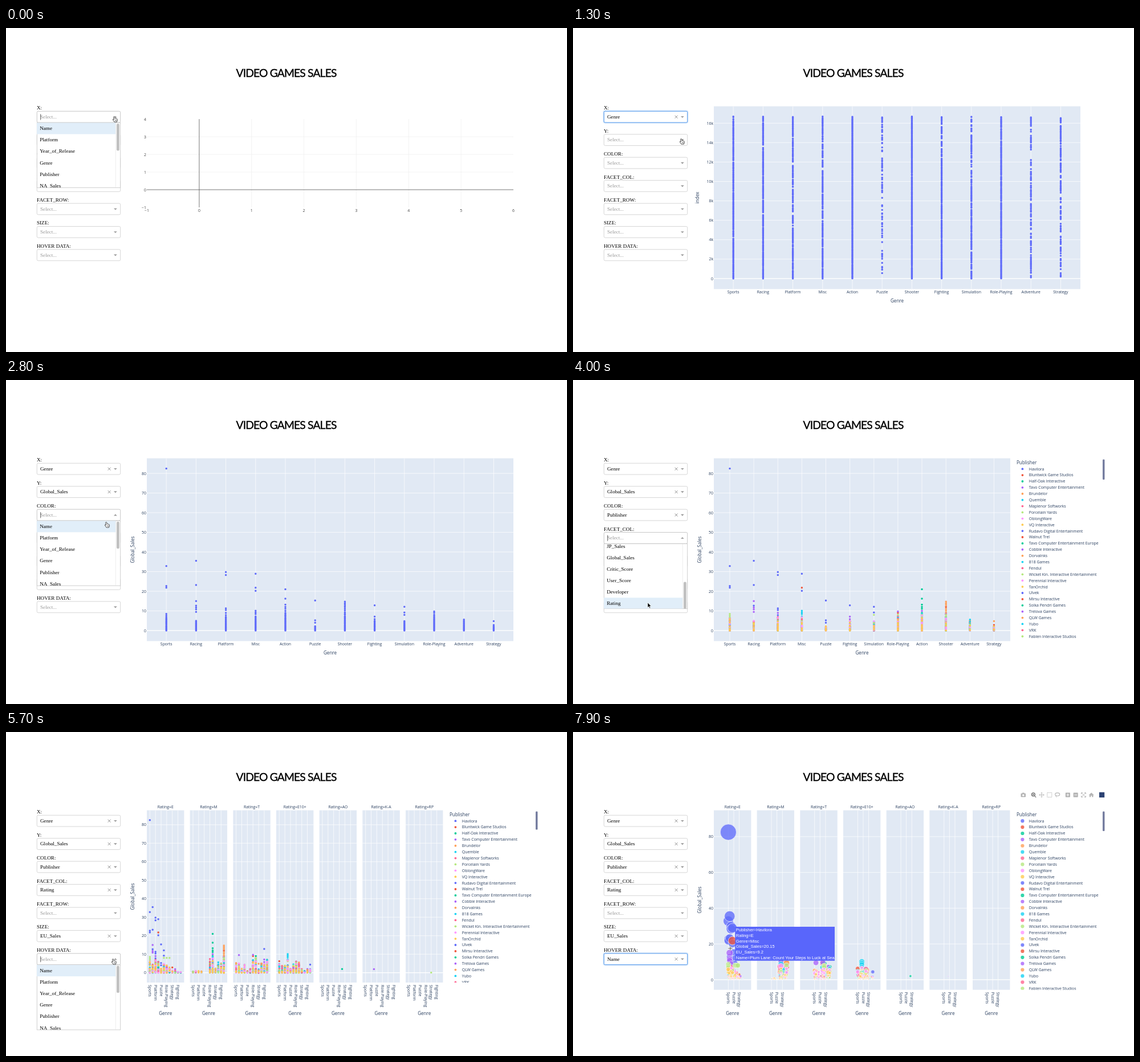
Recreate the animation shown at these times as an HTML page. Size 984 px wide and 569 px high, loop 8 s.

```html
<!DOCTYPE html>
<html lang="en">
<head>
<meta charset="utf-8">
<title>Sales explorer</title>
<style>
  html, body { margin: 0; width: 100%; height: 100%; overflow: hidden; background: #fff; }
  #stage { display: block; width: 100vw; height: 100vh; }
  text { white-space: pre; }
  .title { font: 19.3px Lato, sans-serif; letter-spacing: -.85px; fill: #000; stroke: #000; stroke-width: .35px; }
  .form { font: 9.15px "Liberation Serif", serif; fill: #000; }
  .hint { fill: #999; }
  .tick { font: 6.9px "Open Sans", sans-serif; fill: #2a3f5f; }
  .plain { fill: #444; }
  .axis { font: 8.05px "Open Sans", sans-serif; fill: #2a3f5f; }
  .tip { font: 7.5px "Liberation Sans", sans-serif; fill: #fff; }
  .mid { text-anchor: middle; }
  .end { text-anchor: end; }
</style>
</head>
<body>
<svg id="stage" viewBox="0 0 984 569"></svg>
<script>
const palette = ['#5f6bfa', '#ef553b', '#00cc96', '#ab63fa', '#ffa15a', '#19d3f3', '#ff6692', '#b6e880', '#ff97ff', '#fecb52'];
const labels = ['X:', 'Y:', 'COLOR:', 'FACET_COL:', 'FACET_ROW:', 'SIZE:', 'HOVER DATA:'];
const options = ['Name', 'Platform', 'Year_of_Release', 'Genre', 'Publisher', 'NA_Sales', 'EU_Sales', 'JP_Sales',
  'Global_Sales', 'Critic_Score', 'User_Score', 'Developer', 'Rating'];
const publishers = ['Havilora', 'Bluntwick Game Studios', 'Half-Oak Interactive', 'Tavo Computer Entertainment', 'Brundelor',
  'Quemble', 'Maplenor Softworks', 'Porcelain Yards', 'OblongWare', 'VQ Interactive', 'Rudavo Digital Entertainment',
  'Walnut Trel', 'Tavo Computer Entertainment Europe', 'Cobble Interactive', 'DorvaInks', '818 Games', 'Fendul',
  'Wicket Kin. Interactive Entertainment', 'Perennial Interactive', 'TanOrchid', 'Ulvek', 'Mirsu Interactive',
  'Solka Pendri Games', 'Trelova Games', 'QLW Games', 'Yubo', 'VRK', 'Fablen Interactive Studios'];
const fileOrder = ['Sports', 'Racing', 'Platform', 'Misc', 'Action', 'Puzzle', 'Shooter', 'Fighting', 'Simulation',
  'Role-Playing', 'Adventure', 'Strategy'];
const colorOrder = ['Sports', 'Racing', 'Platform', 'Misc', 'Puzzle', 'Fighting', 'Simulation', 'Role-Playing', 'Action',
  'Shooter', 'Adventure', 'Strategy'];
const facetOrder = ['Sports', 'Racing', 'Platform', 'Misc', 'Puzzle', 'Simulation', 'Role-Playing', 'Action', 'Strategy',
  'Adventure', 'Fighting', 'Shooter'];
const ratings = ['E', 'M', 'T', 'E10+', 'AO', 'K-A', 'RP'];

let seed = 11;
const random = () => (seed = (seed * 16807) % 2147483647) / 2147483647;
const range = n => [...Array(n).keys()];
const text = (x, y, s, cls, extra = '') => `<text x="${x}" y="${y}" class="${cls}" ${extra}>${s}</text>`;
const rect = (x, y, w, h, fill, extra = '') => `<rect x="${x}" y="${y}" width="${w}" height="${h}" fill="${fill}" ${extra}/>`;
const path = (d, stroke, width, extra = '') => `<path d="${d}" fill="none" stroke="${stroke}" stroke-width="${width}" ${extra}/>`;
const turned = (x, y, angle, s, cls) => text(x, y, s, cls, `transform="rotate(${angle} ${x} ${y})"`);

// Best sellers as value:colour+rating index, then random smaller sales below them.
const hits = {
  Sports: '82.5:00 32.8:00 22.7:00 21.8:00 8.5:70 7.6:70 6.8:70 5.2:42 6.2:13',
  Racing: '35.5:00 23.2:00 15:30 12.7:00 11.7:30 10.8:30 9.5:32',
  Platform: '29.8:00 28.3:00 11.3:00 10.4:00 9:30 7.8:00 6.5:00',
  Misc: '28.9:00 21.8:10 20.2:00 10.1:53 9.2:53 8.4:53 7.2:53',
  Puzzle: '15.3:00 5.2:00 4:00',
  Simulation: '12.1:00 9.2:00 8:70 4.5:53',
  'Role-Playing': '9.7:32 9:12 8:70 7.4:61 6:03',
  Action: '21:21 16.2:21 13.2:21 12:21 11.1:21 10:31 9:22 8:70 5.5:43 2:24',
  Strategy: '4.8:42 2.8:10 0.1:76',
  Adventure: '5.6:51 4.6:02 1.9:30',
  Fighting: '12.8:02 7.1:32 5.8:32',
  Shooter: '14.7:41 14:41 13.4:41 12.7:41 12:11 11.2:41 10.3:41 7:22 4.4:03'
};
const stackTops = [
  [6, 5, 7, 6, 3.5, 5, 4, 3, 1.6, 1.4, .5, .5],
  [.8, 1, 1, 1, 0, 0, 6.5, 9, 2.5, 5, 5, 10],
  [5, 5, 2.5, 5, 1, 2, 7, 8, 2, 5, 5, 7],
  [5, 4, 4, 7, 2, 4, 6, 5, 2, 1, 2, 2]
];
const games = [];
for (const genre of facetOrder)
  for (const hit of hits[genre].split(' ')) {
    const [value, code] = hit.split(':');
    games.push({ genre, value: +value, color: +code[0], rating: +code[1], bulk: 1 });
  }
games.push({ genre: 'Misc', value: 1.9, color: 3, rating: 5, bulk: .4 });
stackTops.forEach((tops, rating) => tops.forEach((top, i) => {
  for (let n = top ? top * 5 + 3 : 0; n > 0; n--)
    games.push({ genre: facetOrder[i], value: top * random() ** 1.7, color: Math.floor(random() * 10), rating, bulk: .4 + random() * .8 });
}));
games.sort((a, b) => a.color - b.color);

const dots = (points, color) =>
  path(points.map(([x, y]) => `M${x.toFixed(1)} ${y.toFixed(1)}h.01`).join(''), color, 3.5, 'stroke-linecap="round"');
const colored = (list, place) => palette.map((c, i) => dots(list.filter(g => g.color === i).map(place), c)).join('');

function plot(x, w, bottom, xs, ys, zero) {
  return rect(x, 137.5, w, bottom - 137.5, '#e1e9f4') +
    path(xs.map(v => `M${v} 137.5V${bottom}`).join('') + ys.map(v => `M${x} ${v}h${w}`).join(''), '#fff', .7) +
    path(`M${x} ${zero}h${w}`, '#fff', 1.2);
}
const yLabels = (ys, names) => ys.map((y, i) => text(246, y + 2.5, names[i], 'tick end')).join('');

function emptyChart() {
  const xs = range(8).map(i => 247 + 91.86 * i), ys = range(6).map(i => 315 - 31 * i);
  const name = i => i ? i - 1 : '−1';
  return path(xs.slice(2, 7).map(x => `M${x} 160V315`).join('') + ys.slice(2, 5).map(y => `M247 ${y}H890`).join(''), '#eee', .7) +
    path('M338.9 160V315M247 284H890', '#555', .8) +
    xs.map((x, i) => text(x, 322.5, name(i), 'tick plain mid')).join('') +
    ys.map((y, i) => text(246, y + 2.5, name(i), 'tick plain end')).join('');
}

function genreChart(order, w, first, step, ys, names, yTitle, yTitleX, marks) {
  const xs = order.map((_, i) => first + step * i);
  return plot(247, w, 458.5, xs, ys, 440) + marks(xs) + yLabels(ys, names) +
    order.map((g, i) => text(xs[i], 466, g, 'tick mid')).join('') +
    text(247 + w / 2, 482, 'Genre', 'axis mid') + turned(yTitleX, 298, -90, yTitle, 'axis mid');
}

function indexChart() {
  const counts = [420, 420, 260, 250, 800, 95, 600, 380, 260, 480, 150, 170];
  const bias = [1.3, 1.1, 1.2, 1.2, 1, .8, 1.1, 1.4, 1.3, 1.2, 1, .75];
  const ys = range(9).map(i => 440 - 34.1 * i);
  return genreChart(fileOrder, 643, 281.2, 52.2, ys, ys.map((_, i) => i ? i * 2 + 'k' : 0), 'index', 220.5, xs =>
    dots(xs.flatMap((x, i) => range(counts[i]).map(() => [x, 440 - 284.5 * random() ** bias[i]])), palette[0]));
}

const tens = range(9).map(i => i * 10);
function salesChart(order, w, first, step, draw) {
  return genreChart(order, w, first, step, tens.map(v => 440 - 3.45 * v), tens, 'Global_Sales', 224.5, xs =>
    draw(g => [xs[order.indexOf(g.genre)], 440 - 3.45 * g.value]));
}

function facetChart({ bottom, zero, unit, first, step, every, ticks, titleY, marks }) {
  const ys = ticks.map(v => zero - unit * v);
  const shown = facetOrder.map((name, i) => ({ name, dx: first + step * i })).filter((_, i) => i % every === 0);
  const left = r => 247 + 75.67 * r;
  const frames = ratings.map((name, r) => {
    const x = left(r);
    return plot(x, 65.4, bottom, shown.map(s => x + s.dx), ys, zero) +
      text(x + 32.7, 133.7, 'Rating=' + name, 'tick mid') + text(x + 32.7, 497, 'Genre', 'axis mid') +
      shown.map(s => turned(x + s.dx - 2.4, bottom + 4, 90, s.name, 'tick')).join('');
  }).join('');
  return frames + marks(g => [left(g.rating) + first + step * facetOrder.indexOf(g.genre), zero - unit * g.value]) +
    yLabels(ys, ticks) + turned(224.5, titleY, -90, 'Global_Sales', 'axis mid');
}

function legend(bottom, barHeight, r, opacity) {
  const rows = publishers.map((name, i) => {
    const y = 156.2 + 10.89 * i;
    return `<circle cx="788.4" cy="${y}" r="${r}" fill="${palette[i % 10]}" opacity="${opacity}"/>` + text(799.8, y + 2.4, name, 'tick');
  }).join('');
  return text(778, 147.6, 'Publisher', 'axis') + `<svg width="984" height="${bottom}">${rows}</svg>` +
    rect(929, 139.5, 3.5, barHeight, '#757da0', 'rx="1.2"');
}

const bubbles = place => games.map(g => {
  const [x, y] = place(g);
  return `<circle cx="${x.toFixed(1)}" cy="${y.toFixed(1)}" r="${(1.55 * Math.sqrt(g.value) * g.bulk).toFixed(2)}" fill="${palette[g.color]}" fill-opacity=".78" stroke="#fff" stroke-width=".6"/>`;
}).join('');

const charts = [
  [0, emptyChart()],
  [1300, indexChart()],
  [2700, salesChart(fileOrder, 643, 281.2, 52.2, place => dots(games.map(place), palette[0]))],
  [3400, salesChart(colorOrder, 520, 275, 42.13, place => colored(games, place)) + legend(455, 35.5, 1.9, 1)],
  [4500, facetChart({ bottom: 440, zero: 422.7, unit: 3.248, first: 5.3, step: 4.93, every: 2, ticks: tens, titleY: 289,
    marks: place => colored(games, place) }) + legend(440, 32, 1.9, 1)],
  [6200, facetChart({ bottom: 452.7, zero: 435, unit: 3.14, first: 25.4, step: 2.4, every: 4, ticks: [0, 20, 40, 60, 80],
    titleY: 295, marks: bubbles }) + legend(452.7, 34.5, 3.1, .8)]
];

function modebar() {
  const gray = '#b5b5b5';
  return rect(785.5, 107.8, 8.6, 6.4, gray, 'rx="1"') + rect(788, 106.6, 3.6, 2, gray) + '<circle cx="789.8" cy="111" r="1.8" fill="#fff"/>' +
    '<circle cx="807.4" cy="109.8" r="2.9" fill="none" stroke="#666" stroke-width="1.3"/>' +
    path('M809.6 112L812.2 114.8M806 109.8h2.8M807.4 108.4v2.8', '#666', 1.1) +
    path('M818 110.5h8M822 106.5v8M820.7 107.6l1.3-1.4 1.3 1.4M820.7 113.4l1.3 1.4 1.3-1.4M819.1 109.2l-1.4 1.3 1.4 1.3M824.9 109.2l1.4 1.3-1.4 1.3', gray, .9) +
    rect(831.8, 106.6, 8, 7.8, 'none', `stroke="${gray}" stroke-dasharray="1.6 1"`) +
    `<ellipse cx="849.7" cy="109.6" rx="4" ry="2.7" fill="none" stroke="${gray}" stroke-width="1.1"/>` + path('M847 111.6q-.5 2 1.5 3', gray, 1) +
    rect(863.8, 106.4, 8.2, 8.2, gray, 'rx="1"') + rect(877.6, 106.4, 8.2, 8.2, gray, 'rx="1"') +
    path('M865.6 110.5h4.6M867.9 108.2v4.6M879.4 110.5h4.6', '#fff', 1.1) +
    path('M892.3 107.3l6.4 6.4M898.7 107.3l-6.4 6.4M891.6 109v-2.4h2.4M897 106.6h2.4v2.4M899.4 112v2.4H897M894 114.4h-2.4V112', gray, 1) +
    `<path d="M904.6 110.8l4.6-4.4 4.6 4.4h-1.3v3.5h-2.3v-2.5h-2v2.5h-2.3v-3.5z" fill="${gray}"/>` +
    rect(923, 105.8, 9.2, 9.2, '#2d4373');
}

const tips = [
  [7100, 7500, 282, 316.5, 116.5, ['Rating=E', 'Genre=Platform', 'Global_Sales=28.32', 'EU_Sales=6.94', 'Name=Big Merry Badger Pals. Go']],
  [7500, 8000, 284.3, 342, 174.7, ['Rating=E', 'Genre=Misc', 'Global_Sales=20.15', 'EU_Sales=9.2', 'Name=Plum Lane: Count Your Steps to Luck at Sea']]
].map(([from, to, x, y, w, lines]) => ({ from, to, markup: rect(x, y, w, 59.7, '#5966fb') +
  ['Publisher=' + publishers[0], ...lines].map((s, i) => text(x + 1.5, y + 8.1 + 9.7 * i, s, 'tip')).join('') }));

const picks = [
  { row: 0, item: 3, open: 0, done: 600, scroll: [[0, 0]] },
  { row: 1, item: 8, open: 1400, done: 2500, scroll: [[1750, 0], [2100, 81]], drag: [1700, 2200] },
  { row: 2, item: 4, open: 2700, done: 3100, scroll: [[0, 0]] },
  { row: 3, item: 12, open: 3500, done: 4200, scroll: [[3600, 0], [3900, 146.5]] },
  { row: 5, item: 6, open: 4800, done: 5400, scroll: [[5050, 0], [5300, 60]] },
  { row: 6, item: 0, open: 5700, done: 6100, scroll: [[0, 0]] }
];
const pointer = [
  [0, 191, 160, 'hand'], [100, 191, 160, 'hand'], [250, 150, 195, 'arrow'], [450, 112, 238, 'arrow'], [700, 112, 238, 'arrow'],
  [1100, 191, 205, 'hand'], [1250, 191, 199, 'hand'], [1500, 191, 199, 'hand'], [1700, 195, 218, 'arrow'], [2100, 188, 256, 'arrow'],
  [2200, 188, 258, 'arrow'], [2400, 105, 297, 'arrow'], [2500, 105, 297, 'arrow'], [2680, 191, 238, 'hand'], [2750, 191, 238, 'hand'],
  [2950, 105, 337, 'arrow'], [3100, 105, 337, 'arrow'], [3400, 191, 278, 'hand'], [3550, 191, 278, 'hand'], [3750, 140, 350, 'arrow'],
  [4000, 131, 391, 'arrow'], [4250, 131, 391, 'arrow'], [4600, 191, 359, 'hand'], [5000, 191, 359, 'hand'], [5250, 110, 439, 'arrow'],
  [5400, 110, 439, 'arrow'], [5500, 189, 403, 'hand'], [5750, 189, 403, 'hand'], [6000, 118, 419, 'arrow'], [6150, 118, 419, 'arrow'],
  [6500, 188, 425, 'arrow'], [6700, 188, 425, 'arrow'], [6900, 250, 390, 'cross'], [7100, 277, 355, 'cross'], [7450, 277, 355, 'cross'],
  [7700, 276, 380, 'cross']
];
const cursors = {
  arrow: '<path d="M0 0V8.6L2 6.8 3.3 9.8 4.7 9.2 3.4 6.3H6Z" fill="#000" stroke="#fff" stroke-width=".6"/>',
  hand: '<path d="M-2-4.2q1.2-.8 1.7.5l.6 2.7q.8-.6 1.4.2.8-.5 1.3.3 1.2-.2 1.2 1.1v2L3.4 5H-1L-3.6 1.2q-.5-1.2.9-1L-1.6 1-2.4-3.2Z" fill="#fff" stroke="#222" stroke-width=".8"/>' +
    path('M.5 1.4v2M1.7 1.4v2M2.9 1.4v2', '#222', .5),
  cross: path('M-4 0H4M0-4V4', '#fff', 2) + path('M-3.7 0H3.7M0-3.7V3.7', '#333', .8)
};

// Eased position along keys of the form [time, ...numbers].
function along(keys, t) {
  const next = keys.findIndex(k => k[0] > t);
  if (next === 0) return keys[0].slice(1);
  if (next < 0) return keys[keys.length - 1].slice(1);
  const a = keys[next - 1], b = keys[next], u = (t - a[0]) / (b[0] - a[0]), e = u * u * (3 - 2 * u);
  return a.slice(1).map((v, i) => typeof v === 'number' ? v + (b[i + 1] - v) * e : v);
}

const rowTop = row => 145.9 + 40.45 * row;

function field(label, row, t) {
  const index = picks.findIndex(p => p.row === row), pick = picks[index], next = picks[index + 1];
  const y = rowTop(row), mid = y + 10.2;
  const open = pick && t >= pick.open && t < pick.done, chosen = pick && t >= pick.done;
  const focus = chosen && !(next && t >= next.open);
  return text(54, y - 2.7, label, 'form') +
    (focus ? rect(53.2, y - .7, 148.6, 21.7, 'none', 'rx="2.8" stroke="#cfe3fa" stroke-width="1.2"') : '') +
    rect(54.3, y + .3, 146.4, 19.8, '#fff', `rx="2.2" stroke="${focus ? '#4a93ea' : open ? '#b8b8b8' : '#ccc'}" stroke-width="${focus ? 1 : .8}"`) +
    text(60, mid + 2.7, chosen ? options[pick.item] : 'Select...', chosen ? 'form' : 'form hint') +
    (open ? path(`M60.7 ${mid - 5}v10.4`, '#222', .7) : '') +
    (chosen ? path(`M178.7 ${mid - 2.5}l4.9 5m0-5l-4.9 5`, '#888', .9) : '') +
    `<path d="M189 ${mid + (open ? 1.4 : -1.2)}h5.8l-2.9 ${open ? -2.9 : 2.9}z" fill="#999"/>`;
}

function menu(pick, t, cx, cy) {
  const top = rowTop(pick.row) + 20.4, [scroll] = along(pick.scroll, t), step = 20.1;
  const inside = cx < 186 && cy > top && cy < top + 114;
  const active = inside ? Math.floor((cy - top + scroll) / step) : 0;
  const dragging = pick.drag && t >= pick.drag[0] && t < pick.drag[1];
  const items = options.map((name, i) => {
    const y = i * step - scroll;
    return (i === active ? rect(0, y, 138.5, step, '#e1eef9') : '') + text(5.2, y + 13, name, 'form');
  }).join('');
  return rect(54.3, top, 146.4, 114, '#fff', 'stroke="#c4c4c4" stroke-width=".8"') +
    `<svg x="54" y="${top}" width="146" height="113.8">${items}</svg>` +
    path(`M192.4 ${top + .5}v113`, '#e6e6e6', .7) +
    rect(194, top + 1.6 + scroll * .445, 4.8, 47.5, dragging ? '#7d7d7d' : '#c0c0c0', 'rx="2.2"');
}

const stage = document.getElementById('stage');
stage.innerHTML = text(491.5, 85.8, 'VIDEO GAMES SALES', 'title mid') +
  charts.map(([, markup]) => `<g class="chart">${markup}</g>`).join('') + `<g id="bar">${modebar()}</g><g id="overlay"></g>`;
const layers = [...stage.querySelectorAll('.chart')];
const bar = document.getElementById('bar'), overlay = document.getElementById('overlay');
const show = (node, on) => { node.style.display = on ? '' : 'none'; };

function render(now) {
  const t = now % 8000, [cx, cy, kind] = along(pointer, t);
  const current = charts.filter(([start]) => start <= t).length - 1;
  layers.forEach((layer, i) => show(layer, i === current));
  show(bar, t >= 6900);
  const open = picks.find(p => t >= p.open && t < p.done), tip = tips.find(p => t >= p.from && t < p.to);
  overlay.innerHTML = labels.map((label, row) => field(label, row, t)).join('') +
    (open ? menu(open, t, cx, cy) : '') + (tip ? tip.markup : '') +
    `<g transform="translate(${cx} ${cy})">${cursors[kind]}</g>`;
}

const start = performance.now();
function loop() {
  render(performance.now() - start);
  requestAnimationFrame(loop);
}
loop();
</script>
</body>
</html>
```
